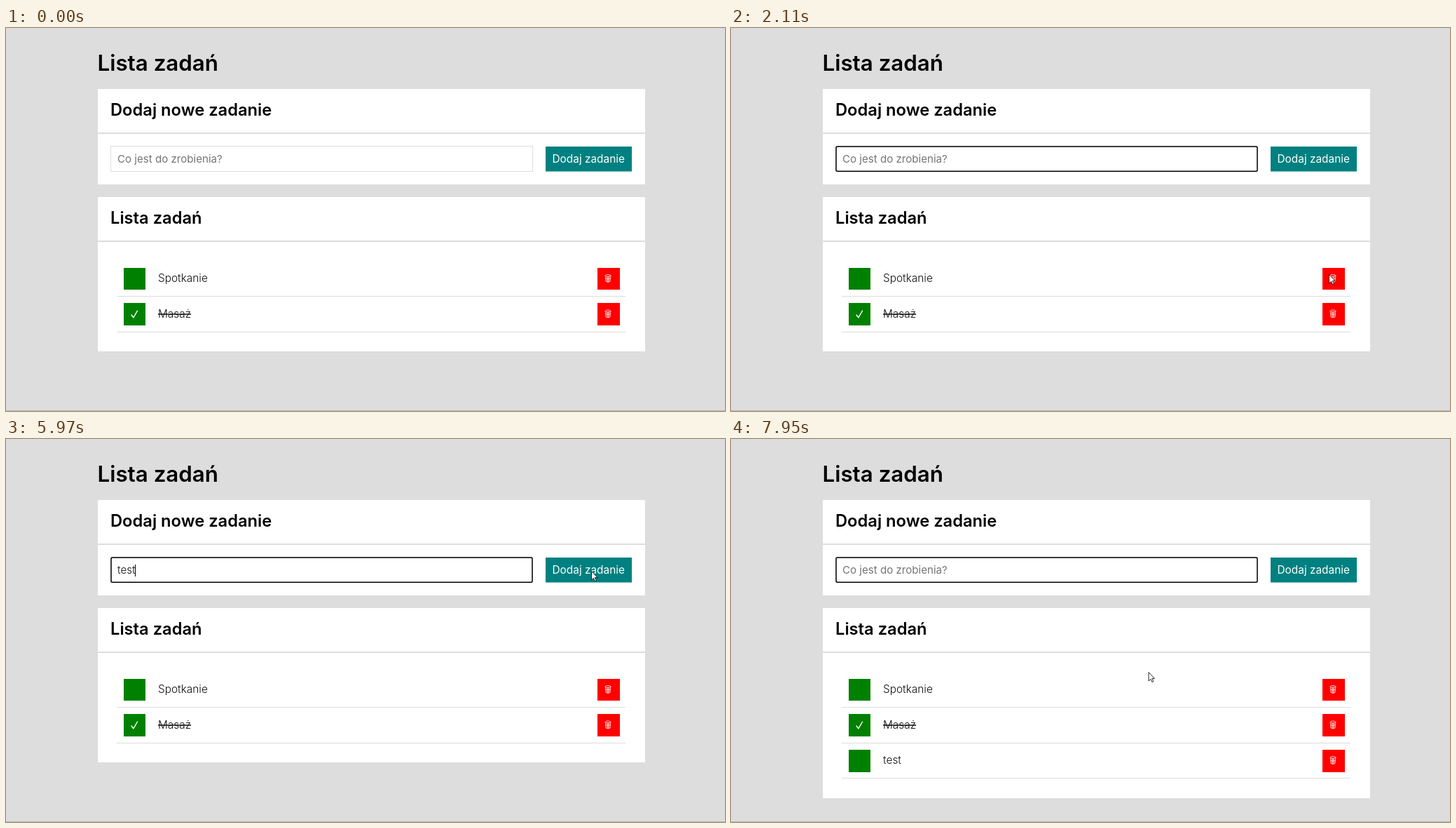
Animation, 1026 px wide and 546 px high, one loop 8 s. Source, as an HTML page:

```html
<!DOCTYPE html>
<html lang="pl">
<head>
<meta charset="utf-8">
<title>Lista zadań</title>
<style>
  html, body { margin: 0; width: 100%; height: 100%; overflow: hidden; background: #ddd; }
  svg { display: block; width: 1026px; height: 546px; font: 400 15.4px Inter, "Open Sans", sans-serif; }
  .h1 { font-size: 31.3px; font-weight: 600; }
  .h2 { font-size: 23.7px; font-weight: 600; }
  .panel { fill: #fff; }
  .field { font-size: 15.1px; }
  .hint { fill: #757575; }
  .btn { fill: #fff; }
  .item { fill: #111; font-weight: 300; }
  .done { text-decoration: line-through; }
  .crisp { shape-rendering: crispEdges; }
  .mark { fill: none; stroke: #fff; stroke-linecap: round; stroke-linejoin: round; }
</style>
</head>
<body>
<svg viewBox="0 0 1026 546">
  <defs>
    <g id="row">
      <g class="crisp">
        <rect x="168" y="341.8" width="31" height="31.6" fill="#008000"/>
        <rect x="844" y="341.8" width="32" height="31.6" fill="#f00"/>
        <rect x="158" y="382.2" width="726" height="1" fill="#ddd"/>
      </g>
      <g class="mark" stroke-width="0.9" opacity="0.85">
        <ellipse cx="859" cy="352.8" rx="3.8" ry="1.4"/>
        <path d="M855.2 353l.8 8.4q3 1.9 6 0l.8-8.4M857.6 354.8l.4 7M860.4 354.8l-.4 7M859 355v7M855.8 357.2q3.2 1.4 6.4 0"/>
      </g>
    </g>
  </defs>

  <rect width="1026" height="546" fill="#ddd"/>
  <path d="M0 545.5H1026" stroke="#b4b4b4"/>
  <text class="h1" x="130.5" y="61">Lista zadań</text>

  <path class="panel" d="M131 87H912V149H131zM131 151H912V223H131z"/>
  <text class="h2" x="149" y="125">Dodaj nowe zadanie</text>
  <rect id="box" x="149.5" y="168.5" width="602" height="36" fill="#fff" stroke="#ddd"/>
  <rect id="focus" x="150" y="169" width="601" height="35.3" rx="2" fill="none" stroke="#000" stroke-width="1.5"/>
  <text id="hint" class="field hint" x="159" y="192">Co jest do zrobienia?</text>
  <text id="typed" class="field item" x="159" y="192"></text>
  <rect id="caret" y="179" width="1" height="17"/>
  <rect x="770" y="169" width="123" height="35.5" fill="#008080"/>
  <text class="btn" x="779.5" y="192">Dodaj zadanie</text>

  <path class="panel" d="M131 241H912V303H131z"/>
  <rect id="list" class="panel" x="131" y="305" width="781" height="156"/>
  <text class="h2" x="149" y="279">Lista zadań</text>
  <use href="#row"/>
  <text class="item" x="217" y="362">Spotkanie</text>
  <use href="#row" y="50.6"/>
  <path class="mark" stroke-width="1.4" d="M179 409l2.8 3.8L187.6 403"/>
  <text class="item done" x="217" y="413">Masaż</text>
  <g id="added">
    <use href="#row" y="101.2"/>
    <text class="item" x="217" y="463">test</text>
  </g>

  <g id="pointer">
    <path id="arrow" d="M.5.5V13L3.4 10.3 5.4 14.6 7.3 13.7 5.4 9.6H9z" fill="#fff" stroke="#111" stroke-width="0.9"/>
    <path id="beam" d="M-3-7.5H-1Q0-7.5 0-6.5V6.5Q0 7.5-1 7.5H-3M3-7.5H1Q0-7.5 0-6.5M3 7.5H1Q0 7.5 0 6.5" fill="none" stroke="#111"/>
  </g>
</svg>
<script>
const LOOP = 8000, TICK = 65, ENTER = 320;
const el = id => document.getElementById(id);
const [focus, hint, typed, caret, list, added, pointer, arrow, beam] =
  ["focus", "hint", "typed", "caret", "list", "added", "pointer", "arrow", "beam"].map(el);

// time, x, y of the pointer
const path = [
  [320, 505, 494], [775, 470.5, 213.5], [970, 452, 187],
  [1685, 452, 187], [2075, 853, 351], [2140, 853.5, 358],
  [5130, 853.5, 358], [5910, 835, 188],
  [7340, 835, 188], [7925, 595.5, 332]
];
const typing = [[0, ""], [3040, "t"], [3370, "te"], [3500, "tes"], [3900, "test"], [6360, ""]];
// time, caret visible
const blink = [
  [0, 0], [1240, 1], [1780, 0], [2310, 1], [2840, 0], [3040, 1], [4440, 0], [4970, 1],
  [5500, 0], [5970, 1], [6230, 0], [6360, 1], [6890, 0], [7430, 1], [7950, 0]
];

const at = (table, t) => table.filter(step => step[0] <= t).pop()[1];
const show = (node, on) => node.setAttribute("visibility", on ? "visible" : "hidden");

function pointerAt(t) {
  const q = ENTER + Math.floor((t - ENTER) / TICK) * TICK;
  const i = path.findIndex(p => p[0] > q);
  if (i < 0) return path[path.length - 1].slice(1);
  if (i === 0) return path[0].slice(1);
  const [t0, x0, y0] = path[i - 1], [t1, x1, y1] = path[i];
  const k = (q - t0) / (t1 - t0), e = k * k * (3 - 2 * k);
  return [x0 + (x1 - x0) * e, y0 + (y1 - y0) * e];
}

function draw(t) {
  const text = at(typing, t);
  if (typed.textContent !== text) typed.textContent = text;
  show(hint, !text);
  show(focus, t >= 1240 && !(t >= 6230 && t < 6360));
  show(caret, at(blink, t));
  caret.setAttribute("x", Math.round(159 + (text ? typed.getComputedTextLength() : 0)));

  const grown = t >= 6360;
  show(added, grown);
  list.setAttribute("height", grown ? 207 : 156);

  const [x, y] = pointerAt(t);
  const inField = x > 149 && x < 752 && y > 168 && y < 205;
  const inside = t >= ENTER;
  pointer.setAttribute("transform", `translate(${x} ${y})`);
  show(arrow, inside && !inField);
  show(beam, inside && inField);
}

const start = performance.now();
function frame(now) {
  draw(Math.max(0, now - start) % LOOP);
  requestAnimationFrame(frame);
}
draw(0);
requestAnimationFrame(frame);
</script>
</body>
</html>
```
